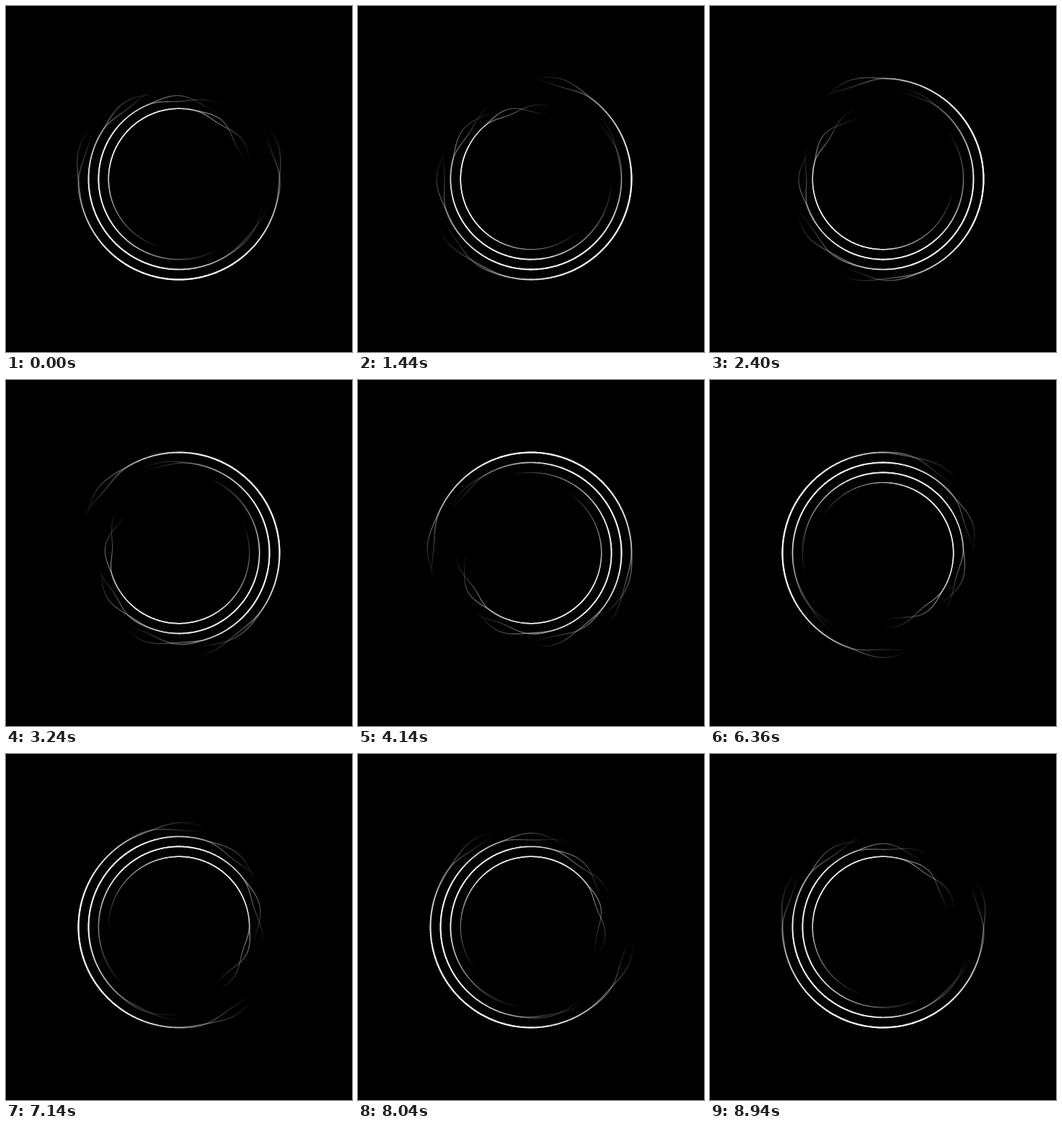
Write an HTML page with a canvas that moves like this. It is 480 by 480 pixels and loops after 9000 ms.

```html
<!DOCTYPE html>
<html lang="en">
<head>
<meta charset="utf-8">
<title>Rings</title>
<style>
  html, body { margin: 0; width: 100%; height: 100%; overflow: hidden; background: #000; }
  canvas { display: block; width: 100vmin; height: 100vmin; }
</style>
</head>
<body>
<canvas id="stage" width="480" height="480"></canvas>
<script>
const ctx = document.getElementById('stage').getContext('2d');
const LOOP = 9000, STEP = 60, CENTER = 240, HALF_ARC = 120, SEGMENT = 1;
const SPREAD = 6, LOBE = 34;

// Outermost first. lead: how strongly the front end unravels;
// loose: degrees past the middle where the back end starts to unravel.
const rings = [
  { radius: 139.5, middle: 90, width: 2, lead: 1, loose: 70 },
  { radius: 125.5, middle: 135, width: 1.8, lead: 0.5, loose: 64 },
  { radius: 111.6, middle: 180, width: 1.65, lead: 0.15, loose: 58 },
  { radius: 97.7, middle: 225, width: 1.5, lead: 0, loose: 52 }
];

const rad = deg => deg * Math.PI / 180;
const clamp = x => Math.min(1, Math.max(0, x));
const smooth = (from, to, x) => {
  const s = clamp((x - from) / (to - from));
  return s * s * (3 - 2 * s);
};

function spreadAt(ring, offset) {
  return offset < 0
    ? SPREAD * ring.lead * smooth(72, 112, -offset)
    : SPREAD * smooth(ring.loose, ring.loose + 45, offset);
}

function pointAt(ring, offset, sign, turn, drift) {
  const angle = ring.middle + offset;
  const origin = offset < 0 ? 0 : 180;
  const wave = Math.sin(Math.PI * (angle - origin - drift) / LOBE);
  const r = ring.radius + sign * spreadAt(ring, offset) * wave;
  const a = rad(angle - turn);
  return [CENTER + r * Math.cos(a), CENTER + r * Math.sin(a)];
}

function drawStrand(ring, sign, turn, drift) {
  for (let u = -HALF_ARC; u < HALF_ARC; u += SEGMENT) {
    const mid = u + SEGMENT / 2;
    const fade = clamp((HALF_ARC - Math.abs(mid)) / 90);
    const dim = mid < 0 ? 1 - 0.35 * (1 - ring.lead) * smooth(20, 80, -mid) : 1;
    const level = Math.round(235 * fade * dim);
    ctx.strokeStyle = `rgb(${level},${level},${level})`;
    ctx.lineWidth = ring.width * (0.7 + 0.3 * fade);
    ctx.beginPath();
    ctx.moveTo(...pointAt(ring, u, sign, turn, drift));
    ctx.lineTo(...pointAt(ring, u + SEGMENT, sign, turn, drift));
    ctx.stroke();
  }
}

function draw(time) {
  const phase = Math.floor(time % LOOP / STEP) * STEP / LOOP;
  const turn = 360 * phase;
  const drift = 4.5 + 6.5 * Math.cos(2 * Math.PI * (phase - 0.42));
  ctx.globalCompositeOperation = 'source-over';
  ctx.fillStyle = '#000';
  ctx.fillRect(0, 0, 480, 480);
  ctx.globalCompositeOperation = 'screen';
  for (const ring of rings) {
    drawStrand(ring, 1, turn, drift);
    drawStrand(ring, -1, turn, drift);
  }
}

const start = performance.now();
function tick() {
  draw(performance.now() - start);
  requestAnimationFrame(tick);
}
tick();
</script>
</body>
</html>
```
